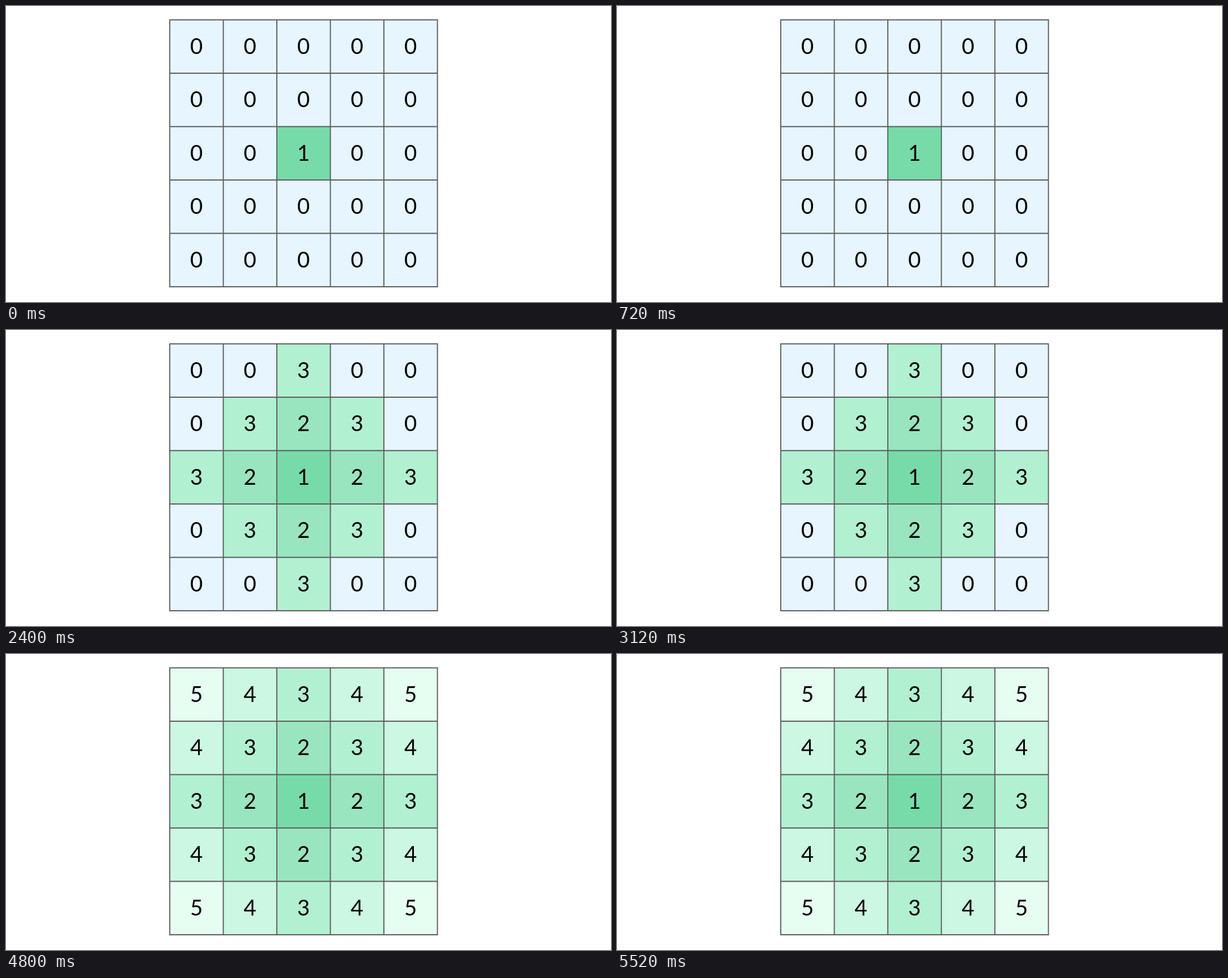
These frames come from a looping animation (1068x524 px, 6000 ms). An HTML page:

```html
<!DOCTYPE html>
<html lang="en">
<head>
<meta charset="utf-8">
<title>Spreading grid</title>
<style>
  html, body { margin: 0; width: 100%; height: 100%; overflow: hidden; background: #fff; }
  svg { display: block; width: 1068px; height: 524px; }
  text { font: 38.5px Lato, sans-serif; text-anchor: middle; fill: #000; }
  path { fill: none; stroke: #5c5c5c; stroke-width: 1.9; stroke-linecap: square; }
</style>
</head>
<body>
<svg viewBox="0 0 1068 524"></svg>
<script>
const SIZE = 5, CELL = 94.5, LEFT = 289.1, TOP = 24.5;
const STEP_MS = 1200, STEPS = 5;
// Index 0 is an unreached cell, the rest go by value.
const COLORS = ['#e6f5ff', '#77dba9', '#99e5bf', '#b2f0d2', '#ccf7e3', '#e6fdf2'];

const svg = document.querySelector('svg');
function add(name, attrs) {
  const node = document.createElementNS('http://www.w3.org/2000/svg', name);
  for (const key in attrs) node.setAttribute(key, attrs[key]);
  return svg.appendChild(node);
}

const cells = [];
for (let row = 0; row < SIZE; row++) {
  for (let col = 0; col < SIZE; col++) {
    const x = LEFT + col * CELL, y = TOP + row * CELL;
    cells.push({
      distance: Math.abs(row - 2) + Math.abs(col - 2),
      box: add('rect', { x, y, width: CELL, height: CELL }),
      label: add('text', { x: x + CELL / 2 - 0.2, y: y + 60 })
    });
  }
}

let lines = '';
for (let i = 0; i <= SIZE; i++) {
  const span = SIZE * CELL;
  lines += `M${LEFT + i * CELL} ${TOP}v${span}M${LEFT} ${TOP + i * CELL}h${span}`;
}
add('path', { d: lines });

let shown = -1;
function draw(now) {
  const step = Math.floor(now / STEP_MS) % STEPS;
  if (step !== shown) {
    shown = step;
    for (const { distance, box, label } of cells) {
      const value = distance <= step ? distance + 1 : 0;
      box.setAttribute('fill', COLORS[value]);
      label.textContent = value;
    }
  }
}

const start = performance.now();
function tick() {
  draw(performance.now() - start);
  requestAnimationFrame(tick);
}
tick();
</script>
</body>
</html>
```
